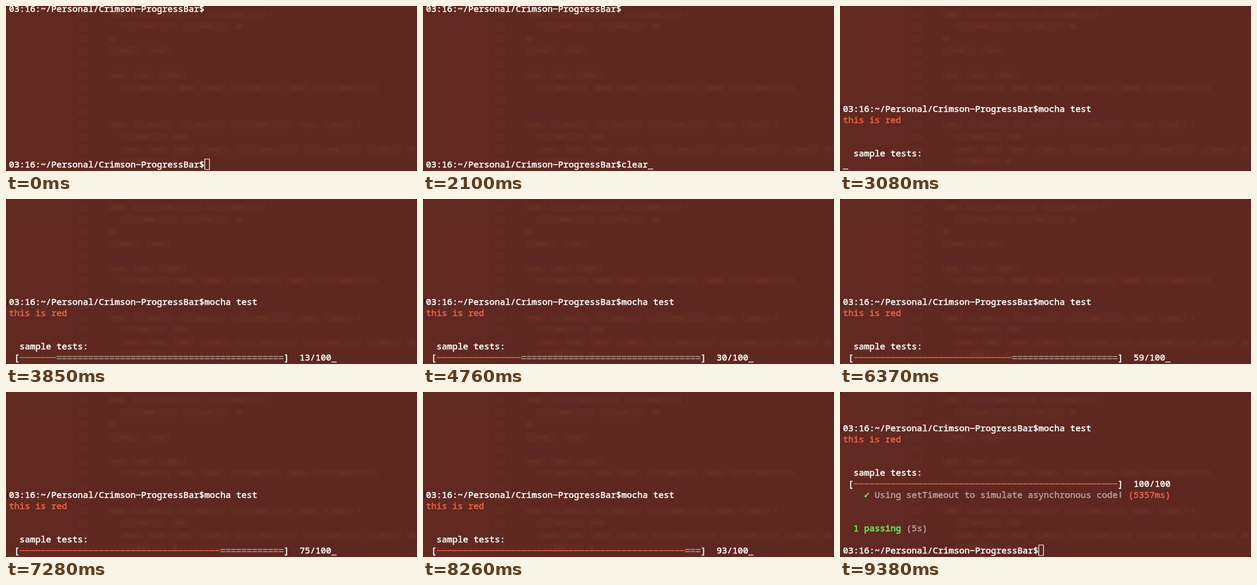
An HTML page with a canvas that plays this animation: 700 px wide and 282 px high, repeating every 9.45 s.

```html
<!DOCTYPE html>
<html lang="en">
<head>
<meta charset="utf-8">
<title>Terminal progress bar</title>
<style>
  html, body { margin: 0; width: 100%; height: 100%; overflow: hidden; background: #5e2720; }
  canvas { display: block; width: 700px; height: 282px; }
</style>
</head>
<body>
<canvas id="screen"></canvas>
<script>
const W = 700, H = 282, LOOP = 9450, STEP = 70;
const CELL = 9, LINE = 19, LEFT = 5, LAST = 271;
const WHITE = '#ffffff', RED = '#e8654a', GREEN = '#6be354', GRAY = '#b5a29d', PALE = '#c3b2ae';
const PROMPT = '03:16:~/Personal/Crimson-ProgressBar$';

const scale = window.devicePixelRatio || 1;
const canvas = document.getElementById('screen');
const ctx = canvas.getContext('2d');
canvas.width = W * scale;
canvas.height = H * scale;

// Small seeded generator, values in 0..1
function seeded(seed) {
  return () => (seed = (seed * 16807) % 2147483647) / 2147483647;
}

function pill(g, x, y, w, h, color) {
  g.fillStyle = color;
  g.beginPath();
  g.roundRect(x, y - h / 2, w, h, Math.min(w, h) / 2);
  g.fill();
}

// One faint line of code: words of random width, each with a brighter token
function ghostLine(g, y, from, to, random) {
  for (let x = from; x < to;) {
    const w = Math.min(to - x, 36 + 90 * random() ** 2);
    const token = Math.min(w * .6, 22);
    pill(g, x, y, w, 17, 'rgba(125,70,58,.1)');
    const tint = random() < .5 ? 'rgba(140,80,28,.16)' : 'rgba(128,92,86,.12)';
    pill(g, x + (w - token) / 2, y, token, 7, tint);
    x += w + 6;
  }
}

function makeBackdrop() {
  const layer = document.createElement('canvas');
  layer.width = canvas.width;
  layer.height = canvas.height;
  const g = layer.getContext('2d');
  g.scale(scale, scale);
  g.fillStyle = '#1d0f0d';
  g.fillRect(0, 0, W, H);
  g.beginPath();
  g.roundRect(0, 0, W, H, 4);
  g.clip();
  g.fillStyle = '#5e2720';
  g.fillRect(0, 0, W, H);
  const side = g.createLinearGradient(0, 0, 125, 0);
  side.addColorStop(0, 'rgba(112,50,40,.22)');
  side.addColorStop(.84, 'rgba(112,50,40,.18)');
  side.addColorStop(1, 'rgba(112,50,40,0)');
  g.fillStyle = side;
  g.fillRect(0, 0, 125, H);

  g.filter = 'blur(1.5px)';
  const random = seeded(41);
  const lineEnds = [452, 406, 190, 282, 0, 308, 642, 0, 0, 604, 312, 700, 294];
  lineEnds.forEach((end, i) => {
    const y = 14 + 21 * i;
    pill(g, 120, y, 22, 18, 'rgba(125,70,58,.1)');
    ghostLine(g, y, i % 5 === 1 || i > 9 ? 192 : 172, end, random);
  });
  return layer;
}

const colX = col => LEFT + col * CELL;
const rowY = up => LAST - up * LINE; // rows counted up from the bottom line

function write(text, col, up, color, weight = .55) {
  const y = rowY(up);
  ctx.fillStyle = ctx.strokeStyle = color;
  ctx.lineWidth = weight;
  ctx.lineJoin = 'round';
  [...text].forEach((ch, i) => {
    const x = colX(col + i);
    if (ch === '-') ctx.fillRect(x + .3, y - .7, 8.4, 1.5);
    else if (ch === '=') {
      ctx.fillRect(x + .5, y - 2.5, 8, 1.3);
      ctx.fillRect(x + .5, y + 1.2, 8, 1.3);
    } else if (ch !== ' ') {
      ctx.fillText(ch, x, y + 5);
      ctx.strokeText(ch, x, y + 5);
    }
  });
}

function lineCursor(col) {
  ctx.fillStyle = WHITE;
  ctx.fillRect(colX(col), LAST + 7, CELL, 1.3);
}

function boxCursor(col) {
  ctx.strokeStyle = WHITE;
  ctx.lineWidth = 1.2;
  ctx.strokeRect(colX(col) + .5, LAST - 9.5, 8, 18);
}

function command(up) {
  ctx.fillStyle = '#2c100d';
  ctx.fillRect(2, rowY(up) - 6, 1.2, 12);
  write(PROMPT + 'mocha test', 0, up, WHITE);
}

function heading(up) {
  command(up + 5);
  write('this is red', 0, up + 4, RED);
  write('sample tests:', 2, up + 1, WHITE);
}

function bar(n, up) {
  const done = Math.min(50, Math.floor(n / 2) + 1);
  const label = n + '/100';
  write('[', 1, up, WHITE);
  write('-'.repeat(done), 2, up, RED);
  write('='.repeat(50 - done), 2 + done, up, PALE);
  write(']', 52, up, WHITE);
  write(label, 55, up, WHITE);
  return 55 + label.length;
}

function typing(t) {
  const typed = t < 1680 ? '' : t < 2310 ? 'clear' : 'mocha test';
  const end = PROMPT.length + typed.length;
  write(PROMPT, 0, 14, WHITE);
  write(PROMPT + typed, 0, 0, WHITE);
  (t < 840 ? boxCursor : lineCursor)(end);
}

function progress(t) {
  const n = Math.floor((t - 3080) / STEP * 1.26);
  heading(0);
  lineCursor(n > 0 ? bar(n, 0) : 0);
}

function results(t) {
  heading(6);
  bar(100, 6);
  write('✓', 4, 5, GREEN, 1);
  write('Using setTimeout to simulate asynchronous code!', 6, 5, GRAY);
  write('(5357ms)', 54, 5, RED);
  write('1 passing', 2, 2, GREEN, .8);
  write('(5s)', 12, 2, GRAY);
  if (t < 8820) return lineCursor(0);
  write(PROMPT, 0, 0, WHITE);
  (t < 8960 ? lineCursor : boxCursor)(PROMPT.length);
}

function draw(t) {
  ctx.setTransform(1, 0, 0, 1, 0, 0);
  ctx.drawImage(backdrop, 0, 0);
  ctx.setTransform(scale, 0, 0, scale, 0, 0);
  ctx.font = '500 15px "Noto Sans Mono", "DejaVu Sans Mono", monospace';
  if (t < 2660) typing(t);
  else if (t < 3080) { command(1); lineCursor(0); }
  else if (t < 8680) progress(t);
  else results(t);
}

const backdrop = makeBackdrop();
const start = performance.now();
function tick() {
  const t = (performance.now() - start) % LOOP;
  draw(Math.floor(t / STEP) * STEP);
  requestAnimationFrame(tick);
}
tick();
</script>
</body>
</html>
```
